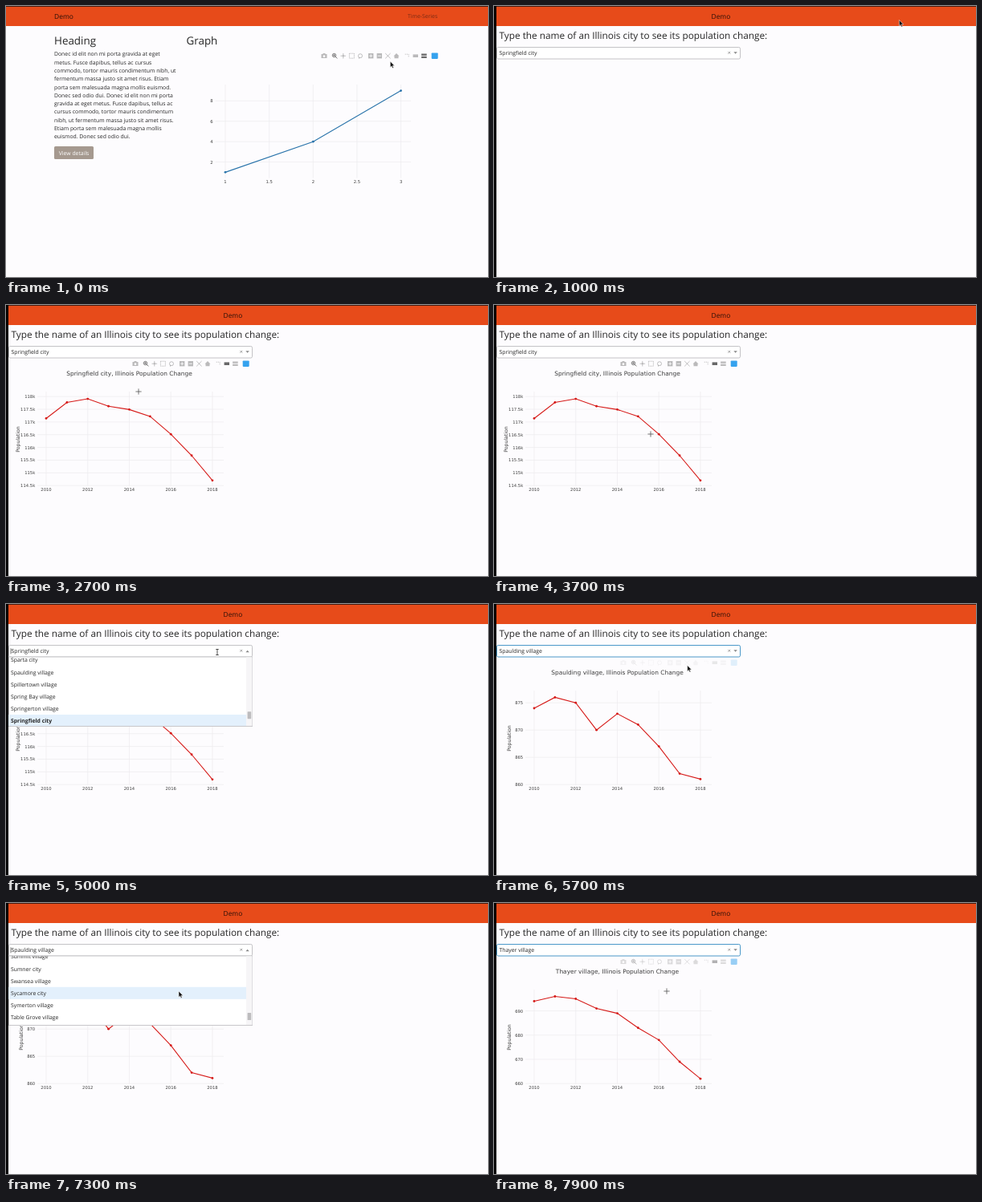
An HTML page that plays this animation: 600 px wide and 338 px high, repeating every 8000 ms.

```html
<!DOCTYPE html>
<html lang="en">
<head>
<meta charset="utf-8">
<title>Demo</title>
<style>
html, body { margin: 0; width: 100%; height: 100%; overflow: hidden; background: #fdfcfe; }
svg { display: block; width: 100vw; height: 100vh; }
text { font-family: "Open Sans", "Noto Sans", sans-serif; fill: #262626; text-rendering: geometricPrecision; }
.plot text { font-family: "DejaVu Sans", Verdana, sans-serif; fill: #3c3c3c; }
.head text { fill: #2a1009; }
</style>
</head>
<body>
<svg id="stage" viewBox="0 0 600 338"></svg>
<script>
const LOOP = 8000, ROW = 15.1, TOP = 66.5, SMALL = 6.85;

// Moments of the session
const NAV = 1000, OPEN = [4800, 6150], PICK = [5500, 7700], LAG = 100;

const text = (x, y, size, str, extra = '') =>
  `<text x="${x}" y="${y}" font-size="${size}" ${extra}>${str}</text>`;
const rect = (x, y, w, h, fill, extra = '') =>
  `<rect x="${x}" y="${y}" width="${w}" height="${h}" fill="${fill}" ${extra}/>`;
const path = (d, extra = '') => `<path d="${d}" ${extra}/>`;
const group = (id, body, extra = '') => `<g id="${id}" ${extra}>${body}</g>`;
const range = (n, f) => Array.from({ length: n }, (_, i) => f(i));
const MID = 'text-anchor="middle"', END = 'text-anchor="end"';

// Path pieces centred on the origin
const box = (w, h, y = 0) => `M${-w / 2} ${y - h / 2}h${w}v${h}h${-w}z`;
const ring = (r, x = 0, y = 0) => `M${x - r} ${y}a${r} ${r} 0 1 0 ${2 * r} 0a${r} ${r} 0 1 0 ${-2 * r} 0z`;
const plus = r => `M${-r} 0H${r}M0 ${-r}V${r}`;
const diag = r => `M${-r} ${-r}L${r} ${r}M${r} ${-r}L${-r} ${r}`;

const solid = d => path(d, 'fill="#444" fill-rule="evenodd"');
const line = (d, dash = 'none') =>
  path(d, `fill="none" stroke="#444" stroke-width=".9" stroke-dasharray="${dash}"`);
const white = d => path(d, 'stroke="#fff" stroke-width=".9"');

const ICONS = [
  [solid(box(7, 5, .4) + box(3, 1, -2.6) + ring(1.4, 0, .5))],
  [line(ring(2.2, -.7, -.7) + 'M.9.9L3.2 3.2') + line('M-1.9-.7H.5M-.7-1.9V.5'),
    line(plus(3.3)) + solid(box(2, 2)), line(box(6, 6), '1.2 .7'), line(ring(2.5) + 'M-1.5 2v1.5')],
  [solid(box(6.4, 6.4)) + white(plus(2)), solid(box(6.4, 6.4)) + white('M-2 0H2'),
    line(diag(3.2)), solid('M-3.5.2L0-3.2L3.5.2z' + box(5, 2.8, 1.6))],
  [line('M-2.5-2H2V2', '1.2 .9'), solid(box(6.4, 3.6)), solid(box(6.6, 2.3, -1.6) + box(6.6, 2.3, 1.7))]
];

// Icons step evenly, with a wider gap between groups; "active" icons are darker
function toolbar(id, x, y, active) {
  let n = 0;
  const dx = g => 10.6 * n + 2.6 * g;
  const icons = ICONS.map((set, g) => set.map(icon => {
    const s = `<g transform="translate(${dx(g)} 0)" opacity="${active.includes(n) ? .8 : .36}">${icon}</g>`;
    n++;
    return s;
  }).join('')).join('');
  return group(id, icons + rect(dx(ICONS.length) - 3.9, -3.7, 8, 7.4, '#35a2ee', 'rx=".8"'),
    `transform="translate(${x} ${y})"`);
}

// Grid, tick labels, line and markers inside box [left, top, right, bottom]
function plot(id, [l, t, r, b], xs, ys, pts, color, extra = '') {
  const grid = xs.map(([, x]) => `M${x} ${t}V${b}`).join('') + ys.map(([, y]) => `M${l} ${y}H${r}`).join('');
  return group(id,
    path(grid, 'stroke="#ecebee" stroke-width=".7"') +
    xs.map(([s, x]) => text(x, b + 6.2, 5.25, s, MID)).join('') +
    ys.map(([s, y]) => text(l - 2.8, y + 1.9, 5.25, s, END)).join('') +
    path('M' + pts.map(p => p.join(' ')).join('L'), `fill="none" stroke="${color}" stroke-width="1.1"`) +
    pts.map(([x, y]) => `<circle cx="${x}" cy="${y}" r="1.4" fill="${color}"/>`).join('') + extra,
    'class="plot"');
}

// Nine yearly values; "step" is the tick distance and "gap" its height on screen
function cityPlot(id, city, titleX, unit, base, step, gap, values) {
  const toX = i => 50 + 25.87 * i, toY = v => 225.2 - (v - base) / step * gap;
  const ticks = range(Math.floor((Math.max(...values) + step / 4 - base) / step) + 1, i => base + i * step);
  return plot(id, [39, 108, 271, 225.7],
    range(5, i => [2010 + 2 * i, toX(2 * i)]), ticks.map(v => [v + unit, toY(v)]),
    values.map((v, i) => [toX(i), toY(v)]), '#d61a18',
    text(153.5, 87.7, 7.45, city + ', Illinois Population Change', MID) +
    text(0, 0, 6.15, 'Population', `${MID} transform="translate(${titleX} 167.5) rotate(-90)"`));
}

function squarePlot() {
  const toX = v => 273 + (v - 1) * 109.3, toY = v => 220.1 - v * 12.73;
  return plot('squares', [260.5, 98, 504, 214.6],
    range(5, i => 1 + i / 2).map(v => [v, toX(v)]), range(4, i => 2 * i + 2).map(v => [v, toY(v)]),
    [1, 2, 3].map(v => [toX(v), toY(v * v)]), '#2a74ab');
}

// "*" marks a city, the others are villages
const places = ('South Pekin,South Roxana,South Wilmington,Sparland,Sparta*,Spaulding,Spillertown,Spring Bay,' +
  'Springerton,Springfield*,Spring Grove,Spring Valley*,Standard,Standard City,Staunton*,Steeleville,Steger,' +
  'Sterling*,Steward,Stewardson,Stickney,Stillman Valley,Stockton,Stonefort,Stone Park,Stonington,Stoy,' +
  'Strasburg,Strawn,Streamwood,Streator*,Stronghurst,Sublette,Sugar Grove,Sullivan*,Summerfield,Summit,' +
  'Sumner*,Swansea,Sycamore*,Symerton,Table Grove,Tallula,Tamaroa,Tamms,Tampico,Taylor Springs,' +
  'Taylorville*,Tennessee,Teutopolis,Thawville,Thayer,Thebes,Third Lake,Thomasboro,Thompsonville')
  .split(',').map(s => s.endsWith('*') ? s.slice(0, -1) + ' city' : s + ' village');
const VISITS = ['Springfield city', 'Spaulding village', 'Thayer village'].map(s => places.indexOf(s));

const LOREM = `Donec id elit non mi porta gravida at eget
metus. Fusce dapibus, tellus ac cursus
commodo, tortor mauris condimentum nibh, ut
fermentum massa justo sit amet risus. Etiam
porta sem malesuada magna mollis euismod.
Donec sed odio dui. Donec id elit non mi porta
gravida at eget metus. Fusce dapibus, tellus ac
cursus commodo, tortor mauris condimentum
nibh, ut fermentum massa justo sit amet risus.
Etiam porta sem malesuada magna mollis
euismod. Donec sed odio dui.`.split('\n');

const header = body =>
  `<g class="head">${rect(0, 0, 600, 25, '#e74b1a') + rect(0, 0, 600, 1, '#451d13') + body}</g>`;

const home = group('home',
  header(text(60, 15.8, 8.45, 'Demo') + text(500, 15.4, SMALL, 'Time-Series', 'id="link"')) +
  text(60, 48, 13.4, 'Heading') + text(224.5, 48, 13.4, 'Graph') +
  LOREM.map((s, i) => text(60, 62.3 + 10.3 * i, SMALL, s)).join('') +
  rect(60, 175, 49, 16, '#a5998f', 'rx="1.6"') +
  text(84.6, 185.7, SMALL, 'View details', MID + ' style="fill:#fff"') +
  squarePlot() + toolbar('barA', 396, 62.2, [1, 11]));

const list = group('list',
  rect(3.5, 66, 303, 86.5, '#fff', 'stroke="#c8c7ca"') +
  '<g clip-path="url(#clip)">' + group('rows', rect(3, 0, 296, ROW, '#e3f0fc', 'id="hover"') +
    places.map((s, i) => text(6, TOP + ROW * i + 10, SMALL, s, 'class="row"')).join('')) + '</g>' +
  rect(299, 66.4, 7.5, 85.6, '#f6f5f7') + rect(300.6, 0, 4.6, 9, '#bdbcbe', 'id="thumb" rx=".6"'));

const series = group('series',
  header(text(282.4, 15.8, 8.4, 'Demo', MID)) + rect(0, 0, 3, 338, '#000') +
  text(6.5, 40.8, 11.8, 'Type the name of an Illinois city to see its population change:') +
  cityPlot('c0', 'Springfield city', 16.5, 'k', 114.5, .5, 15.86,
    [117.14, 117.77, 117.91, 117.62, 117.49, 117.22, 116.52, 115.68, 114.7]) +
  cityPlot('c1', 'Spaulding village', 20.5, '', 860, 5, 34,
    [874, 876, 875, 870, 873, 871, 867, 862, 861]) +
  cityPlot('c2', 'Thayer village', 20.5, '', 660, 10, 30.2,
    [694, 696, 695, 691, 689, 683, 678, 669, 662]) +
  toolbar('barB', 161, 73.2, [1, 10]) +
  rect(3.5, 51.5, 303, 14.5, '#fff', 'id="field" rx="1.8"') +
  text(6.5, 61.1, SMALL, '', 'id="value"') +
  path('M6 55.3v7', 'id="caret" stroke="#222" stroke-width=".6"') +
  path(diag(1.4), 'transform="translate(292.8 58.3)" stroke="#888" stroke-width=".8"') +
  path('M298.4-1.2h4.4l-2.2 2.4z', 'id="arrow" fill="#888"') + list);

const CURSORS = {
  pointer: path('M0 0V7.4L1.7 5.9L2.9 8.6L4.2 8L3 5.4H5.3z', 'fill="#111" stroke="#fff" stroke-width=".5"'),
  cross: path(plus(3.6), 'stroke="#555" stroke-width=".8"'),
  beam: path('M0-3.5V3.5M-1.7-3.5H1.7M-1.7 3.5H1.7', 'stroke="#222" stroke-width=".8"'),
  hand: path('M-.6 0H1V3L4.7 4L4 8.4H.2L-2.2 5L-.6 4.4z', 'fill="#fff" stroke="#111" stroke-width=".7"')
};

document.getElementById('stage').innerHTML =
  `<clipPath id="clip">${rect(3, 66.3, 296, 85.8, '#000')}</clipPath>` + home + series +
  Object.entries(CURSORS).map(([id, body]) => group(id, body)).join('');

const $ = id => document.getElementById(id);
const show = (id, on) => { $(id).style.display = on ? '' : 'none'; };
const set = (id, name, v) => $(id).setAttribute(name, v);
const clamp = (v, lo = 0, hi = 1) => Math.min(hi, Math.max(lo, v));

// Cursor stops: time, x, y
const STOPS = [
  [0, 478.3, 69], [900, 517, 13], [1200, 469, 30], [1400, 469, 30], [1700, 284, 111],
  [2700, 165, 108], [3700, 195, 161], [4600, 263, 60], [5000, 263, 60], [PICK[0], 240.7, 77.6],
  [5700, 240.7, 76.5], [6100, 244, 59], [6700, 237, 88.2], [7200, 215, 110], [LOOP, 215, 110]
];

function cursorAt(t) {
  const i = STOPS.findIndex(s => s[0] > t);
  const [t0, x0, y0] = STOPS[i - 1], [t1, x1, y1] = STOPS[i];
  const k = (t - t0) / (t1 - t0), e = k * k * (3 - 2 * k);
  return [x0 + (x1 - x0) * e, y0 + (y1 - y0) * e];
}

// The toolbar fades over 300 ms as the cursor enters and leaves the chart
const HOVERS = [[-300, 350], [1700, 4450], [5660, 5950], [7750, LOOP]];
const ramp = (t, from) => clamp((t - from) / 300);
const fadeAt = t => HOVERS.reduce((sum, [on, off]) => sum + ramp(t, on) - ramp(t, off), 0);

function draw(t) {
  const [x, y] = cursorAt(t);
  const onHome = t < NAV;
  const picks = PICK.filter(p => t >= p).length;
  const open = t >= OPEN[picks];
  const chosen = VISITS[picks];
  const chart = t < NAV + LAG ? -1 : PICK.filter(p => t >= p + LAG).length;

  show('home', onHome);
  show('series', !onHome);
  ['barA', 'barB'].forEach(id => set(id, 'opacity', fadeAt(t)));
  VISITS.forEach((_, i) => show('c' + i, i === chart));

  $('value').textContent = places[chosen];
  set('field', 'stroke', picks && !open ? '#4a98c9' : '#c4c3c6');
  set('arrow', 'transform', open ? 'translate(0 59) scale(1 -1)' : 'translate(0 58.5)');
  show('caret', open && (t - OPEN[picks]) % 1060 < 530);

  show('list', open);
  if (open) {
    // The second list is wheeled down in eight notches
    const notch = clamp(Math.floor((t - 6700) / 100), 0, 8) / 8;
    const scroll = picks ? (TOP + ROW * (VISITS[2] + .5) - 110) * notch : 64.4;
    const hover = y > TOP ? Math.floor((y + scroll - TOP) / ROW) : chosen;
    set('rows', 'transform', `translate(0 ${-scroll})`);
    set('hover', 'y', TOP + ROW * hover);
    set('thumb', 'y', 133.8 + scroll * .006);
    document.querySelectorAll('.row').forEach((r, i) => { r.style.fontWeight = i === chosen ? 700 : 400; });
  }

  const onLink = onHome && x > 499 && y < 20;
  $('link').style.fill = onLink ? '#5c1f0e' : '#7c2c16';
  const inPlot = !onHome && !open && x > 39 && x < 271 && y > 107 && y < 226;
  const inField = !onHome && x < 290 && y > 51 && y < 66;
  const kind = onLink ? 'hand' : inPlot ? 'cross' : inField ? 'beam' : 'pointer';
  Object.keys(CURSORS).forEach(id => show(id, id === kind));
  set(kind, 'transform', `translate(${x} ${y})`);
}

const start = performance.now();
(function tick() {
  draw((performance.now() - start) % LOOP);
  requestAnimationFrame(tick);
})();
</script>
</body>
</html>
```
